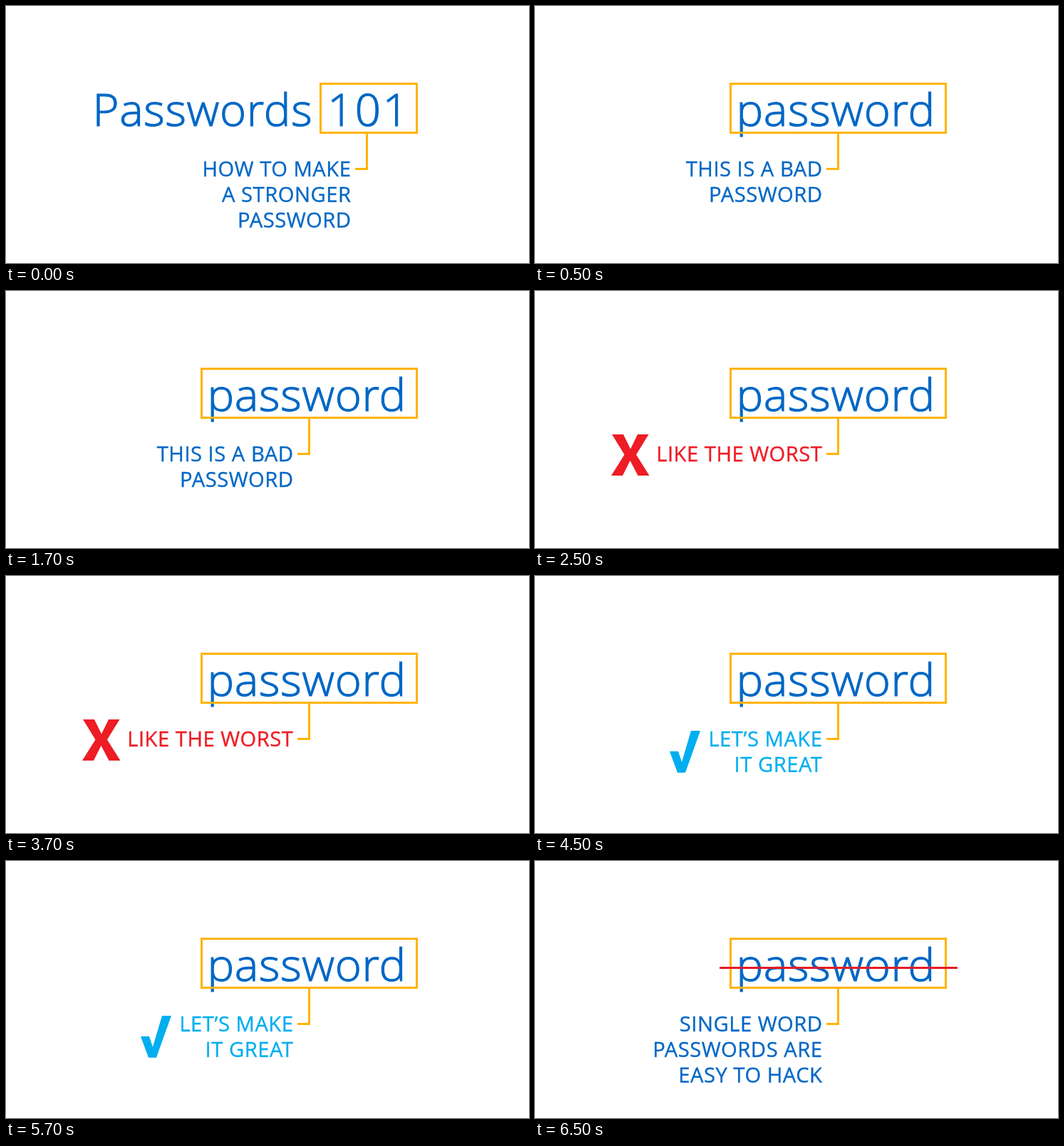
Write an HTML page that moves like this. It is 734 by 362 pixels and loops after 8000 ms.

```html
<!DOCTYPE html>
<html lang="en">
<head>
<meta charset="utf-8">
<title>Password tips</title>
<style>
  html, body { margin: 0; width: 100%; height: 100%; overflow: hidden; background: #fff; }
  svg { display: block; width: 100vw; height: 100vh; }
  text { font-family: "Open Sans", "Noto Sans", sans-serif; fill: currentColor; stroke: currentColor; color: #0067c5; }
  .big { font-size: 63.4px; font-weight: 300; letter-spacing: .6px; stroke-width: 1.1px; }
  .number { letter-spacing: 2.6px; }
  .caption { font-size: 29.2px; letter-spacing: .5px; stroke-width: .35px; text-anchor: end; }
  .frame { fill: none; stroke: #ffb300; stroke-width: 3; }
</style>
</head>
<body>
<svg viewBox="0 0 734 362">
  <g id="title">
    <text class="big" x="121.500" y="168.500">Passwords</text>
    <text class="big number" x="451" y="168.500">101</text>
  </g>
  <text id="word" class="big" x="282.500" y="168.500">password</text>
  <path id="frame" class="frame"/>
  <g id="caption"></g>
  <path id="cross" fill="#ee1c25" d="M108 202H124L134 222.500L144 202H159.500L142 230.500L160.500 260H144.500L133.500 239L123 260H107L125.500 230.500Z"/>
  <path id="check" fill="#00aeef" d="M189 247H201L206 262L219 218H232L211 277H200Z"/>
  <path id="strike" stroke="#e31b23" stroke-width="3" d="M259 150.500H593"/>
</svg>
<script>
const LOOP = 8000;
const BLUE = "#0067c5", RED = "#ee1c25", CYAN = "#00aeef";
const scenes = [
  { start: 0, lines: ["HOW TO MAKE", "A STRONGER", "PASSWORD"], color: BLUE, title: true },
  { start: 500, lines: ["THIS IS A BAD", "PASSWORD"], color: BLUE },
  { start: 2500, lines: ["LIKE THE WORST"], color: RED, mark: "cross" },
  { start: 4500, lines: ["LET’S MAKE", "IT GREAT"], color: CYAN, mark: "check" },
  { start: 6500, lines: ["SINGLE WORD", "PASSWORDS ARE", "EASY TO HACK"], color: BLUE, mark: "strike" }
];

const el = id => document.getElementById(id);
const show = (id, on) => el(id).setAttribute("visibility", on ? "visible" : "hidden");

function draw(scene) {
  const left = scene.title ? 441.5 : 274.5;
  const stem = scene.title ? 506.5 : 425.5;
  const right = stem - 22;
  el("frame").setAttribute("d",
    `M${left} 109.5H576.5V178.5H${left}ZM${stem} 178.5V229.5H${stem - 16.5}`);
  show("title", scene.title);
  show("word", !scene.title);
  for (const id of ["cross", "check", "strike"]) show(id, scene.mark === id);
  el("caption").innerHTML = scene.lines.map((line, i) =>
    `<text class="caption" x="${right}" y="${240 + 36 * i}" style="color:${scene.color}">${line}</text>`).join("");
}

let current;
function tick(now) {
  const t = now % LOOP;
  const scene = scenes.findLast(s => s.start <= t);
  if (scene !== current) draw(current = scene);
  requestAnimationFrame(tick);
}
tick(performance.now());
</script>
</body>
</html>
```
